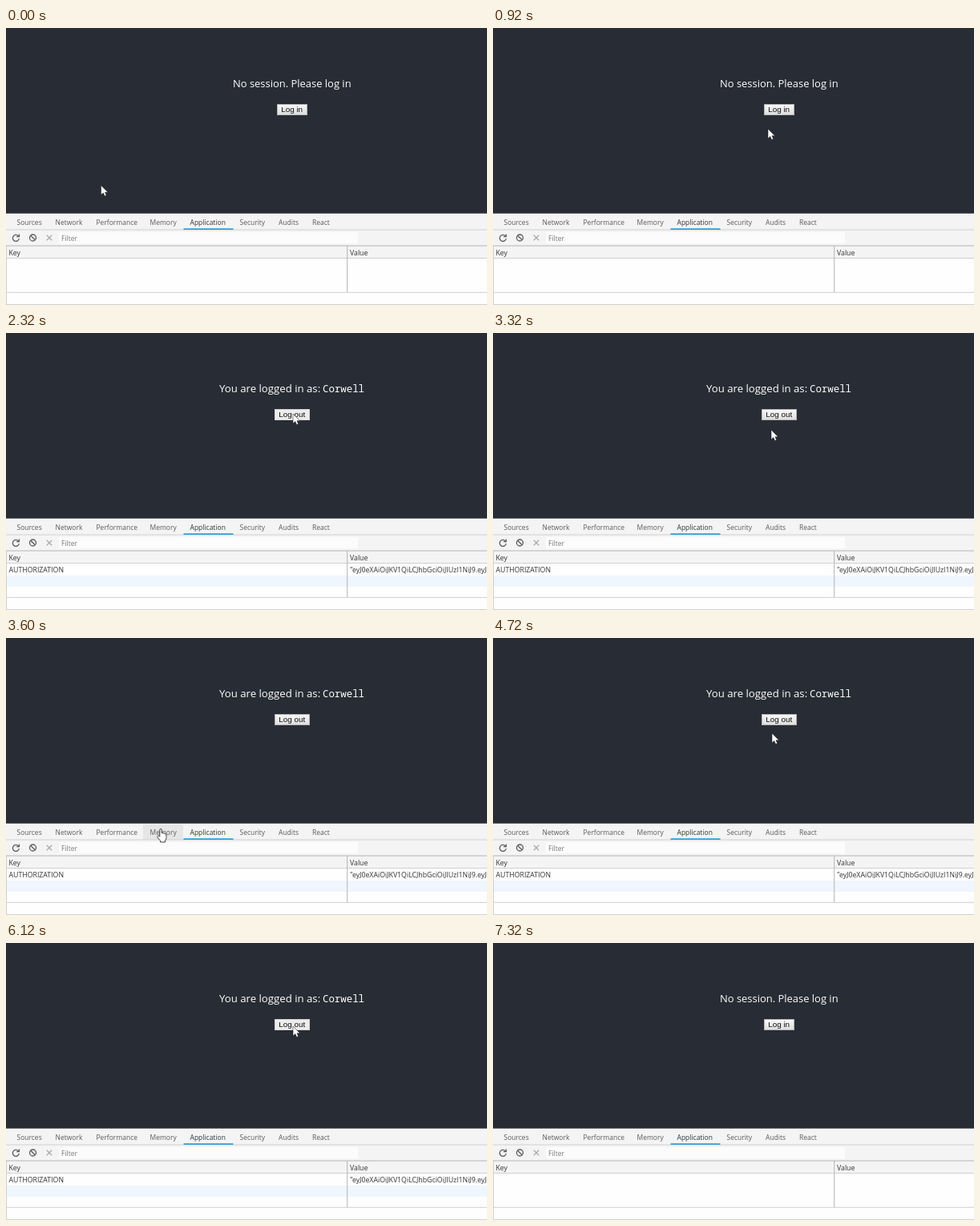
An HTML page for the animation above (8200 ms loop, 600x346 px).

```html
<!DOCTYPE html>
<html lang="en">
<head>
<meta charset="utf-8">
<title>Session demo</title>
<style>
  html, body { margin: 0; width: 100%; height: 100%; overflow: hidden; background: #282c34; }
  svg { display: block; width: 600px; height: 346px; }
  text { font-family: "Open Sans", "Noto Sans", sans-serif; font-size: 8.75px; fill: #333; white-space: pre; }
  .page text { font-size: 12.95px; fill: #fff; }
  .page .status { font-size: 13.2px; }
  .page .user { font: 12.4px "Noto Sans Mono", monospace; }
  .page .label { font: 9.9px "Liberation Sans", Arial, sans-serif; fill: #111; }
  #tabs text { font-size: 8.5px; fill: #5a5a5a; }
  #tabs .active { fill: #333; }
  .icon { fill: none; stroke: #5c5c5c; stroke-width: 1.3; }
  .line { fill: none; stroke: #d0d0d0; }
</style>
</head>
<body>
<svg viewBox="0 0 600 346">
  <defs>
    <linearGradient id="face" x2="0" y2="1">
      <stop stop-color="#f8f8f8"/><stop offset="1" stop-color="#dedede"/>
    </linearGradient>
  </defs>
  <rect width="600" height="346" fill="#282c34"/>

  <g class="page">
    <g id="guest">
      <text x="283" y="74">No session. Please log in</text>
      <rect class="button" x="338.5" y="95.5" width="37" height="13"/>
      <text class="label" x="343.2" y="105.2">Log in</text>
    </g>
    <g id="member">
      <text class="status" x="266" y="74">You are logged in as:</text>
      <text class="user" x="395" y="74">Corwell</text>
      <rect class="button" x="335.5" y="95.5" width="43" height="13"/>
      <text class="label" x="340.2" y="105.2">Log out</text>
    </g>
  </g>

  <rect y="231.7" width="600" height="115" fill="#f4f4f4"/>
  <rect id="hover" y="233" height="19" fill="#e6e6e6"/>
  <path class="line" d="M0 252H600"/>
  <g id="tabs"></g>
  <path d="M221.5 251.2H283.5" stroke="#2f9fd8" stroke-width="1.8"/>

  <rect x="66" y="255" width="373" height="14.5" fill="#fcfcfc"/>
  <text x="69" y="266" style="font-size:8.5px;fill:#777">Filter</text>
  <path class="icon" d="M15.4 259.8A4 4 0 1 0 16.3 263M16.4 257.6V260.6H13.2"/>
  <g class="icon"><circle cx="33.5" cy="262" r="4"/><path d="M30.7 259.2L36.3 264.8"/></g>
  <path class="icon" style="stroke:#aaa" d="M50.8 258.8L57.2 265.2M57.2 258.8L50.8 265.2"/>

  <rect y="288" width="600" height="58" fill="#fefefe"/>
  <g id="entry">
    <rect y="303" width="600" height="14" fill="#eff6fd"/>
    <text x="3.5" y="299">AUTHORIZATION</text>
    <text x="429" y="299">"eyJ0eXAiOiJKV1QiLCJhbGciOiJIUzI1NiJ9.eyJ</text>
  </g>
  <path class="line" d="M0 287.5H600M0.5 272V346M0 330.3H600M0 345.5H600"/>
  <path class="line" style="stroke:#b4b4b4" d="M0 272H600M425.7 272V330"/>
  <text x="3.5" y="283.5">Key</text>
  <text x="429" y="283.5">Value</text>

  <g id="cursor" fill="#fff" stroke="#111" stroke-width=".5" stroke-linejoin="round">
    <path id="arrow" d="M0 0V12L2.8 9.5L4.6 13.5L6.7 12.6L5 8.7H8.7Z"/>
    <path id="hand" d="M-1.2 9.5V1Q-1.2 0 0 0T1.2 1V5Q3 4.4 3.4 5.6Q5 5.2 5.4 6.3Q7 6 7 7.6V11Q7 13 5.6 14.4V16.5H-.4V14.8L-4.2 10.4Q-4.6 9 -3.4 8.6Q-2.4 8.6 -1.2 9.5Z" stroke-width=".8"/>
  </g>
</svg>
<script>
const LOOP = 8200, LOGIN = 1520, LOGOUT = 6320;
const $ = id => document.getElementById(id);
const show = (el, on) => el.setAttribute("visibility", on ? "visible" : "hidden");

// label, text x, left and right edge
const TABS = [
  ["Sources", 13.5, 5, 53], ["Network", 61.5, 53, 104], ["Performance", 112.5, 104, 171],
  ["Memory", 179.5, 171, 221], ["Application", 229.5, 221, 284], ["Security", 291.5, 284, 332],
  ["Audits", 340, 332, 374], ["React", 382, 374, 412]
];
$("tabs").innerHTML = TABS.map(([name, x]) =>
  `<text x="${x}" y="246"${name === "Application" ? ' class="active"' : ""}>${name}</text>`).join("");

// time, pointer x, pointer y
const PATH = [
  [0, 118.5, 196.5], [520, 241, 204], [800, 337, 138], [920, 343, 126],
  [1200, 358, 101], [2320, 358, 101], [2720, 349, 118], [3320, 347, 121],
  [3600, 193, 238.5], [3920, 115, 278], [4200, 108, 284], [4520, 292, 170],
  [4720, 348, 119], [5000, 358, 104], [6520, 358, 104], [7120, -12, 170]
];

const snap = t => Math.floor(t / 200) * 200 + (t % 200 >= 120 ? 120 : 0);

function pointer(t) {
  const i = PATH.findIndex(p => p[0] > t);
  if (i < 0) return PATH[PATH.length - 1].slice(1);
  const [t0, x0, y0] = PATH[i - 1], [t1, x1, y1] = PATH[i];
  const k = (t - t0) / (t1 - t0);
  return [x0 + (x1 - x0) * k, y0 + (y1 - y0) * k];
}

function draw(ms) {
  const t = snap(ms % LOOP);
  const member = t >= LOGIN && t < LOGOUT;
  const [x, y] = pointer(t);

  show($("guest"), !member);
  show($("member"), member);
  show($("entry"), member);

  const over = Math.abs(x - 357) < 20 && y > 94 && y < 110;
  for (const b of document.querySelectorAll(".button")) {
    b.setAttribute("fill", over ? "#ececec" : "url(#face)");
    b.setAttribute("stroke", over ? "#d4d4d4" : "#b4b4b4");
  }

  const tab = y > 232 && y < 252 && TABS.find(([, , l, r]) => x >= l && x < r);
  show($("hover"), tab);
  if (tab) {
    $("hover").setAttribute("x", tab[2]);
    $("hover").setAttribute("width", tab[3] - tab[2]);
  }
  show($("hand"), tab);
  show($("arrow"), !tab);
  $("cursor").setAttribute("transform", `translate(${x} ${y})`);
}

const start = performance.now();
function tick() {
  draw(performance.now() - start);
  requestAnimationFrame(tick);
}
tick();
</script>
</body>
</html>
```
